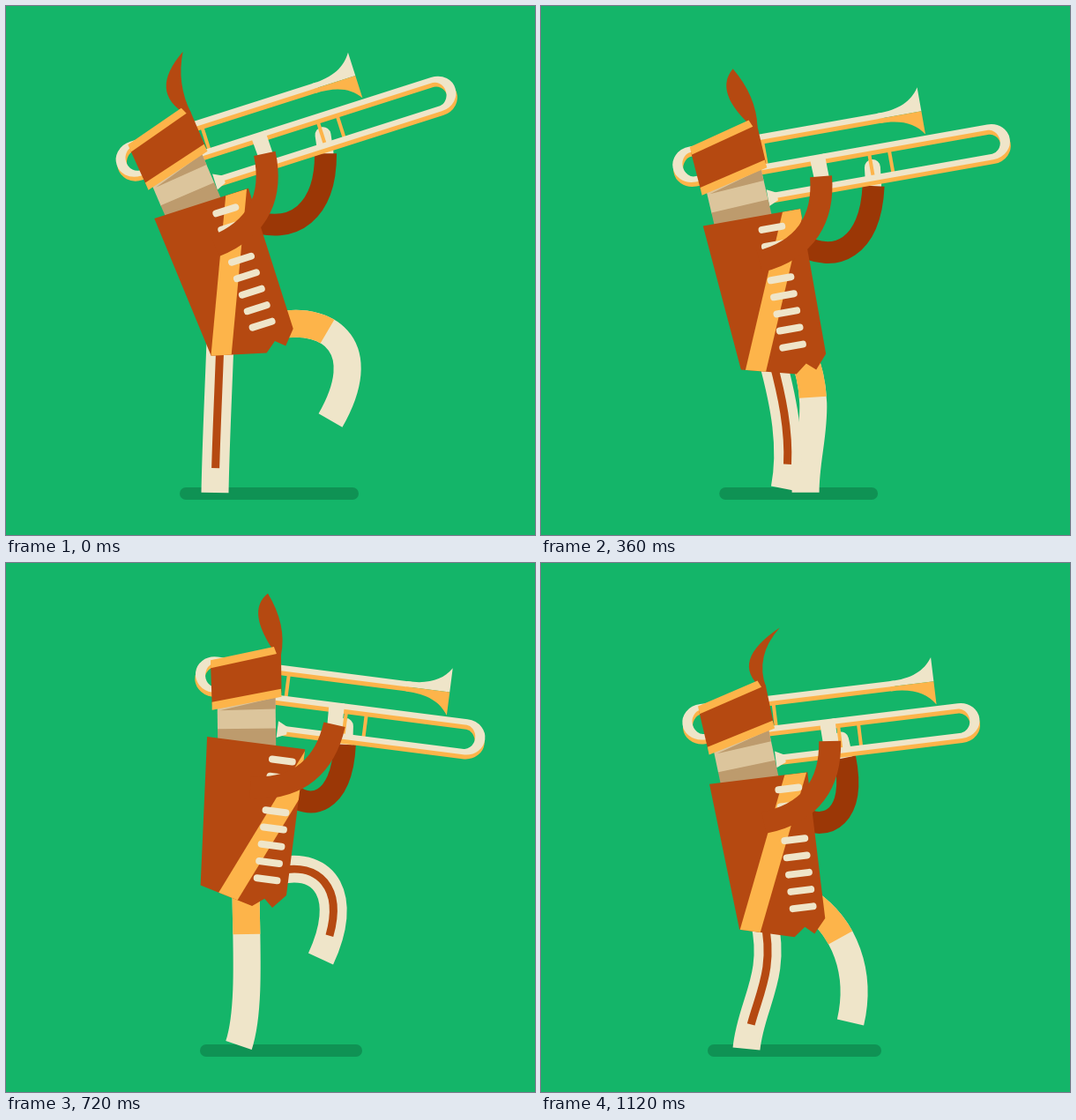
These frames come from a looping animation (600 px wide and 600 px high, 1.2 s). An HTML page with a canvas:

```html
<!DOCTYPE html>
<html lang="en">
<head>
<meta charset="utf-8">
<title>Marching trombonist</title>
<style>
  html, body { margin: 0; width: 100%; height: 100%; overflow: hidden; background: #14b569; }
  canvas { display: block; width: 600px; height: 600px; }
</style>
</head>
<body>
<canvas id="stage" width="600" height="600"></canvas>
<script>
const ctx = document.getElementById('stage').getContext('2d');
const LOOP = 1200, STEP = 40, LAST = 1120;
const GREEN = '#14b569', SHADE = '#0f9254', CREAM = '#efe5c9', GOLD = '#fdb44a',
      RUST = '#b54911', DARK = '#9b3706', SKIN = '#dcc59c', SKIN_SHADE = '#bd9b6d';
const RAD = Math.PI / 180;

// Each row: time, then the values at that time.
const tracks = {
  hipX: [[0, 279], [280, 278.5], [440, 270], [560, 269], [720, 268], [880, 268], [1120, 273]],
  hipY: [[0, 384], [80, 377.5], [160, 375.5], [280, 379], [440, 431], [520, 413], [560, 395],
         [720, 373.5], [800, 372], [880, 374.7], [1040, 431], [1120, 412]],
  lean: [[0, -17.7], [140, -22], [280, -19.2], [440, 0], [560, 4.4], [720, 7.3],
         [790, 7.8], [880, 6.2], [1120, -6.9]],
  nod: [[0, -5.5], [200, -8], [280, -7], [440, 0], [520, -4], [560, -4.4], [720, -8],
        [880, -6.7], [1040, 0], [1120, -5]],
  plume: [[0, 18], [120, -9], [220, -19], [280, -17], [440, 7], [540, 28], [560, 27],
          [720, -9], [820, -18], [880, -16], [1040, 7], [1120, 27], [1140, 28]],
  slide: [[0, 578], [90, 596], [280, 544], [440, 596], [500, 600], [560, 594],
          [720, 521], [880, 517], [1120, 521]],
  sash: [[0, 293], [280, 295], [440, 307], [560, 318], [720, 321], [880, 320], [1040, 304], [1120, 294]],
  buttons: [[0, 288], [280, 284.5], [440, 284.5], [560, 287], [720, 296], [880, 297], [1120, 296.5]],
  shadow: [[0, 197, 400], [280, 199, 392], [440, 207, 374], [560, 213, 386],
           [720, 220, 404], [880, 224, 392], [1120, 189, 386]],
  nearLeg: [
    [0, 243, 380, 241, 437, 238, 495, 237, 552],
    [120, 244, 367, 244, 425, 250, 505, 236, 547],
    [280, 247, 375, 252, 440, 258, 500, 238, 543],
    [440, 285, 425, 310, 460, 324, 500, 324, 552],
    [520, 300, 405, 335, 420, 352, 465, 338, 521],
    [560, 308, 380, 347, 385, 370, 430, 342, 495],
    [720, 310, 349, 362, 338, 390, 378, 357, 449],
    [880, 287, 375, 316, 420, 332, 490, 332, 551],
    [1040, 256, 405, 284, 480, 238, 505, 232, 552],
    [1120, 253, 405, 268, 470, 238, 500, 233, 551]
  ],
  farLeg: [
    [0, 310, 362, 368, 352, 415, 388, 368, 470],
    [120, 322, 351, 374, 340, 404, 378, 371, 449],
    [280, 303, 368, 332, 415, 350, 480, 349, 551],
    [440, 288, 405, 314, 480, 266, 505, 260, 552],
    [520, 281, 400, 296, 465, 266, 500, 262, 551],
    [560, 277, 380, 282, 440, 266, 500, 264, 551],
    [720, 272, 365, 272, 425, 278, 505, 264, 547],
    [880, 274, 365, 278, 425, 290, 500, 268, 543],
    [1040, 297, 425, 322, 460, 336, 500, 335, 552],
    [1120, 302, 384, 345, 413, 364, 465, 351, 521]
  ]
};

// Smooth looping interpolation that does not overshoot the keys.
function sample(keys, t) {
  const n = keys.length;
  const at = i => {
    const turn = Math.floor(i / n), key = keys[i - turn * n];
    return { t: key[0] + turn * LOOP, v: key.slice(1) };
  };
  let i = n - 1;
  while (i > 0 && keys[i][0] > t) i--;
  const [p, a, b, q] = [at(i - 1), at(i), at(i + 1), at(i + 2)];
  const span = b.t - a.t, u = (t - a.t) / span;
  const tangent = (d, e) => d * e > 0 ? 2 * d * e / (d + e) : 0;
  return a.v.map((v, k) => {
    const mid = (b.v[k] - v) / span;
    const m0 = tangent((v - p.v[k]) / (a.t - p.t), mid) * span;
    const m1 = tangent(mid, (q.v[k] - b.v[k]) / (q.t - b.t)) * span;
    const d = b.v[k] - v;
    return v + u * (m0 + u * (3 * d - 2 * m0 - m1 + u * (m0 + m1 - 2 * d)));
  });
}

const mix = (a, b, u) => a + (b - a) * u;

function poly(color, ...pts) {
  ctx.beginPath();
  for (let i = 0; i < pts.length; i += 2) ctx.lineTo(pts[i], pts[i + 1]);
  ctx.closePath();
  ctx.fillStyle = color;
  ctx.fill();
}

function stroke(color, width, cap = 'butt') {
  ctx.strokeStyle = color;
  ctx.lineWidth = width;
  ctx.lineCap = cap;
  ctx.stroke();
}

function line(color, width, x0, y0, x1, y1, cap) {
  ctx.beginPath();
  ctx.moveTo(x0, y0);
  ctx.lineTo(x1, y1);
  stroke(color, width, cap);
}

function curve(color, width, [x0, y0, x1, y1, x2, y2, x3, y3], dash = []) {
  ctx.beginPath();
  ctx.moveTo(x0, y0);
  ctx.bezierCurveTo(x1, y1, x2, y2, x3, y3);
  ctx.setLineDash(dash);
  stroke(color, width);
  ctx.setLineDash([]);
}

function rotateAbout(x, y, degrees) {
  ctx.translate(x, y);
  ctx.rotate(degrees * RAD);
  ctx.translate(-x, -y);
}

function drawLegs(far, near) {
  curve(CREAM, 31, far);
  curve(GOLD, 31, far, [56, 999]);
  curve(CREAM, 31, near);
  const [a, b, c, d, e, f, g, h] = near;
  curve(RUST, 9, [g, h, e, f, c, d, a, b], [0, 28, 999, 0]);
}

function drawFarArm(end) {
  const hand = end - 160, u = (hand - 362) / 71;
  const sag = 40 * u * (1 - u), wrist = hand + mix(3, -4, u);
  line(CREAM, 18, wrist, 250, hand + 1, 229, 'round');
  curve(DARK, 25, [308, mix(311, 289, u), mix(333, 358, u), mix(331, 321, u) + sag,
                   mix(370, 403, u), mix(319, 301, u) + sag, wrist, 250]);
}

function drawTrombone(end) {
  for (const x of [291, end - 160, end - 137]) {
    const top = x === 291 ? 178 : 212;
    line(GOLD, 4, x, top, x, top + 32);
  }
  // The tube is thicker sideways, so its bends look heavier than its runs.
  const tube = (color, dy) => {
    ctx.save();
    ctx.translate(0, dy);
    ctx.beginPath();
    ctx.moveTo(430, 175.5);
    ctx.lineTo(208.5, 175.5);
    ctx.arc(208.5, 192.6, 17.1, -Math.PI / 2, Math.PI / 2, true);
    ctx.lineTo(end - 22.5, 209.7);
    ctx.arc(end - 22.5, 226.6, 16.9, -Math.PI / 2, Math.PI / 2);
    ctx.lineTo(290, 243.5);
    ctx.scale(1.75, 1);
    stroke(color, 6.4);
    ctx.restore();
  };
  tube(GOLD, 2.5);
  tube(CREAM, -2.5);
  poly(CREAM, 286, 233, 297, 238.5, 297, 247, 286, 252);

  ctx.fillStyle = CREAM;
  ctx.beginPath();
  ctx.moveTo(425, 169.8);
  ctx.bezierCurveTo(450, 170, 465, 163, 474.5, 148.5);
  ctx.lineTo(474.5, 176);
  ctx.lineTo(425, 176);
  ctx.fill();
  ctx.fillStyle = GOLD;
  ctx.beginPath();
  ctx.moveTo(425, 176);
  ctx.lineTo(474.5, 176);
  ctx.lineTo(474.5, 202.5);
  ctx.bezierCurveTo(465, 188, 450, 181.4, 425, 181.2);
  ctx.fill();
}

function drawHead(nod, bend) {
  ctx.save();
  rotateAbout(254, 265, nod);
  poly(SKIN, 221, 215, 287, 210, 287, 247, 221, 247);
  poly(SKIN_SHADE, 221, 246, 287, 246, 287, 276, 221, 276);
  poly(SKIN_SHADE, 224, 225, 287, 211, 287, 224);

  const x = 291, y = 163;
  const tipX = x + 71 * Math.sin(bend * RAD), tipY = y - 71 * Math.cos(bend * RAD);
  ctx.fillStyle = RUST;
  ctx.beginPath();
  ctx.moveTo(x - 2, y);
  ctx.quadraticCurveTo(x - 36 + 0.15 * bend, y - 47 + 0.35 * bend, tipX, tipY);
  ctx.quadraticCurveTo(x + 7 - 0.35 * bend, y - 35 - 0.1 * bend, x + 3, y);
  ctx.fill();

  poly(RUST, 214, 174, 288, 159, 294, 160, 294, 206, 215, 219);
  poly(GOLD, 214, 168, 286, 153.5, 289, 161.5, 214, 177);
  poly(GOLD, 215, 215.5, 293.5, 201.5, 294, 210.5, 215, 224.5);
  ctx.restore();
}

function drawTorso(sash, buttonX) {
  ctx.save();
  poly(RUST, 208, 261, 320, 261, 320, 428, 306, 444, 296, 435, 283, 445, 222, 429);
  ctx.clip();
  const foot = 215 + (sash - 293) * 0.85;
  poly(GOLD, sash, 261, sash + 25, 261, foot + 25, 445, foot, 445);
  ctx.restore();
  for (let k = 0; k < 8; k++) {
    if (k === 2) continue; // behind the sleeve
    const y = 277 + 19.4 * k;
    line(CREAM, 8, buttonX - 11.5, y, buttonX + 11.5, y, 'round');
  }
}

function drawNearArm() {
  poly(CREAM, 340.5, 206, 358, 204, 358.5, 232, 341.5, 232);
  curve(RUST, 25, [264, 312, 320, 308, 345, 275, 349.5, 229]);
}

function draw(t) {
  const pose = {};
  for (const name in tracks) pose[name] = sample(tracks[name], t);
  const [slide] = pose.slide, [left, right] = pose.shadow;

  ctx.fillStyle = GREEN;
  ctx.fillRect(0, 0, 600, 600);
  line(SHADE, 14, left + 7, 553, right - 7, 553, 'round');
  drawLegs(pose.farLeg, pose.nearLeg);

  ctx.save();
  ctx.translate(pose.hipX[0] - 270, pose.hipY[0] - 431);
  rotateAbout(270, 431, pose.lean[0]);
  drawFarArm(slide);
  drawTrombone(slide);
  drawHead(pose.nod[0], pose.plume[0]);
  drawTorso(pose.sash[0], pose.buttons[0]);
  drawNearArm();
  ctx.restore();
}

const start = performance.now();
function tick() {
  const ms = (performance.now() - start) % LOOP;
  draw(Math.min(Math.floor(ms / STEP) * STEP, LAST));
  requestAnimationFrame(tick);
}
tick();
</script>
</body>
</html>
```
